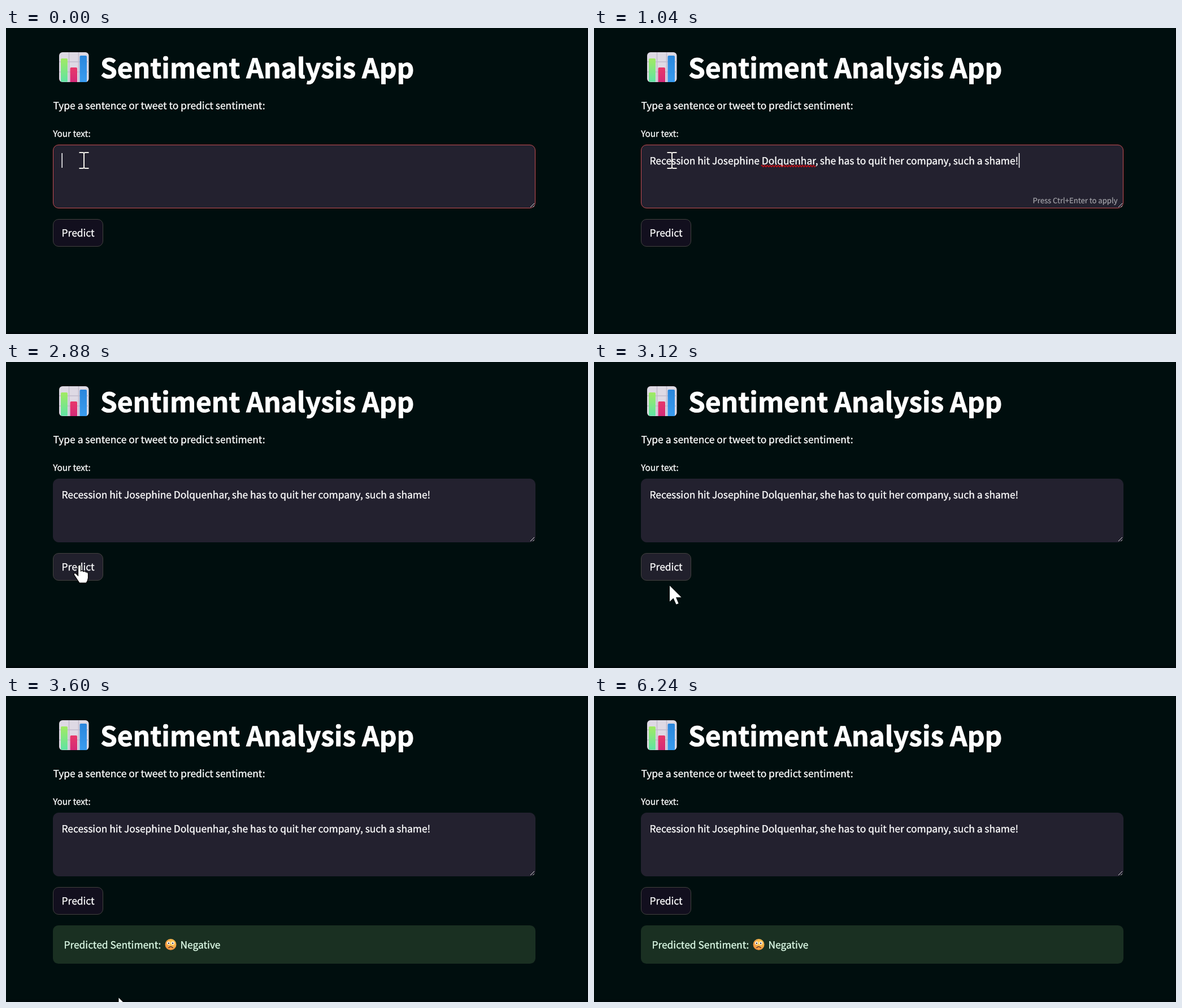
Animation of 1030x543 px, one loop 7840 ms. Source, as an HTML page:

```html
<!DOCTYPE html>
<html lang="en">
<head>
<meta charset="utf-8">
<title>Sentiment Analysis App</title>
<style>
  html, body { margin: 0; width: 100%; height: 100%; overflow: hidden; background: #000e0e; }
  svg { display: block; width: 100vw; height: 100vh; }
  text {
    font: 17.4px "Noto Sans CJK SC", "Noto Sans CJK JP", "Noto Sans CJK KR", "Noto Sans CJK", "Open Sans", sans-serif;
    color: #fff; fill: currentColor; stroke: currentColor; stroke-width: .35;
    text-rendering: geometricPrecision; white-space: pre;
  }
  .title { font-size: 47.8px; font-weight: 700; stroke-width: .9; }
  .label { font-size: 15.25px; }
  .hint { font-size: 13.1px; color: #a3a3a9; stroke-width: .2; text-anchor: end; }
  .result text { color: #dffde9; }
  .line { fill: none; stroke: #fff; }
</style>
</head>
<body>
<svg viewBox="0 0 1030 543" preserveAspectRatio="none">
  <defs>
    <linearGradient id="green" x2="0" y2="1"><stop stop-color="#a2ea62"/><stop offset="1" stop-color="#5fe3a4"/></linearGradient>
    <linearGradient id="pink" x2="0" y2="1"><stop stop-color="#e8386a"/><stop offset="1" stop-color="#d42a78"/></linearGradient>
    <linearGradient id="blue" x2="0" y2="1"><stop stop-color="#2a86dc"/><stop offset="1" stop-color="#3a9cf0"/></linearGradient>
    <radialGradient id="face" cx=".6" cy=".35" r=".7"><stop stop-color="#ffd65a"/><stop offset="1" stop-color="#ee8a3a"/></radialGradient>
  </defs>
  <rect width="1030" height="543" fill="#000e0e"/>
  <path d="M0 539H1030V543H0ZM1028 0H1030V543H1028Z" fill="#00090b"/>

  <rect x="94" y="43" width="52.5" height="53" rx="6" fill="#ded9e4"/>
  <path d="M111.5 43V96M128.5 43V96M94 60H146.5M94 78H146.5" class="line" style="stroke:#c2bccd;stroke-width:1.6"/>
  <path d="M97 95V56q0-2 2-2h8q2 0 2 2V95.5h-10Z" fill="url(#green)"/>
  <path d="M113.5 96V72q0-2 2-2h8.500q2 0 2 2V96Z" fill="url(#pink)"/>
  <path d="M130.5 96V51q0-2 2-2h8.500q2 0 2 2V96Z" fill="url(#blue)"/>

  <text class="title" x="167" y="89">Sentiment Analysis App</text>
  <text x="83.5" y="144">Type a sentence or tweet to predict sentiment:</text>
  <text class="label" x="83.2" y="192.5">Your text:</text>

  <rect id="area" x="83.5" y="207.5" width="853" height="112" rx="9.5" fill="#23212f"/>
  <path d="M928 318L935 311M932.5 318L935 315.5" class="line" style="stroke:#d8d8d8"/>
  <g id="entry">
    <text x="98.5" y="242">Recession hit Josephine Dolquenhar,<tspan x="399.8">she has to quit her company, such a shame!</tspan></text>
  </g>
  <g id="editing">
    <path id="squiggle" class="line" style="stroke:#d90b12;stroke-width:1.3"/>
    <text class="hint" x="926.5" y="310.5">Press Ctrl+Enter to apply</text>
  </g>
  <path id="caret" d="M0 222V248" class="line" style="stroke-width:1.5"/>

  <rect id="button" x="83.5" y="339.5" width="88" height="48" rx="9.5" stroke="#43413f"/>
  <text x="127.6" y="369.7" text-anchor="middle">Predict</text>

  <g id="result" class="result">
    <rect x="83" y="407" width="854" height="68" rx="9.7" fill="#1a3022"/>
    <text x="102.4" y="447.7">Predicted Sentiment:</text>
    <circle cx="291.5" cy="441" r="10" fill="url(#face)"/>
    <g fill="#fff"><circle cx="287.8" cy="438.5" r="2.7"/><circle cx="295.2" cy="438.5" r="2.7"/></g>
    <g fill="#3a2a2a"><circle cx="287.9" cy="438.7" r="1.3"/><circle cx="295.1" cy="438.7" r="1.3"/></g>
    <path d="M287.5 447q4-4.500 8 0" class="line" style="stroke:#5a2a2a;stroke-width:1.5"/>
    <text x="308.5" y="447.7">Negative</text>
  </g>

  <g id="cursor">
    <path id="beam" d="M-8.5-14H-2.5Q0-14 0-12Q0-14 2.5-14H8.5M0-13V13M-8.5 14H-2.5Q0 14 0 12Q0 14 2.5 14H8.5" class="line" style="stroke:#f2f0ea;stroke-width:2"/>
    <path id="arrow" d="M0 0V28L6.5 22L11.5 33L15.5 31.5L11 20.5H20.5Z" fill="#fff"/>
    <path id="hand" d="M-2.5 2Q0-2 2.5 2V11Q5 9 7 12Q10 10 11.5 13Q15 12 15.5 16V23Q15 28 12 32H0Q-3 28-6 23L-10 17Q-9 13-5.5 16L-2.5 19Z" fill="#fff" stroke="#000" stroke-width="1.2"/>
  </g>
</svg>
<script>
const LOOP = 7840, STEP = 80;
const $ = id => document.getElementById(id);
const show = (id, on) => $(id).style.display = on ? "" : "none";

// start time, pointer shape, position
const pointer = [
  [0, "beam", 138, 235],
  [2400, "beam", 135.5, 277],
  [2640, "hand", 130, 360],
  [3120, "arrow", 134, 397],
  [3200, "arrow", 168, 494],
  [3360, "arrow", 199.5, 535.5],
  [6240, "", 0, 0]
];
const pasteAt = 880, clickAt = 2880;

$("squiggle").setAttribute("d", "M296 245" + "q1.2-3 2.4 0t2.4 0".repeat(20));

function draw(ms) {
  const t = Math.floor(ms / STEP) * STEP;
  const pasted = t >= pasteAt, focused = t < clickAt;

  show("entry", pasted);
  show("editing", pasted && focused);
  show("caret", t < 560 || pasted && t < 1680);
  $("caret").setAttribute("transform", `translate(${pasted ? 752.5 : 99.2})`);
  $("area").setAttribute("stroke", focused ? "#c74c52" : "#23212f");
  $("button").setAttribute("fill", t >= 2640 && t < 3200 ? "#21202c" : "#120f1e");
  show("result", t >= 3600);

  const [, shape, x, y] = pointer.findLast(p => p[0] <= t);
  for (const id of ["beam", "arrow", "hand"]) show(id, id === shape);
  $("cursor").setAttribute("transform", `translate(${x} ${y})`);
}

const start = performance.now();
function tick() {
  draw((performance.now() - start) % LOOP);
  requestAnimationFrame(tick);
}
tick();
</script>
</body>
</html>
```
